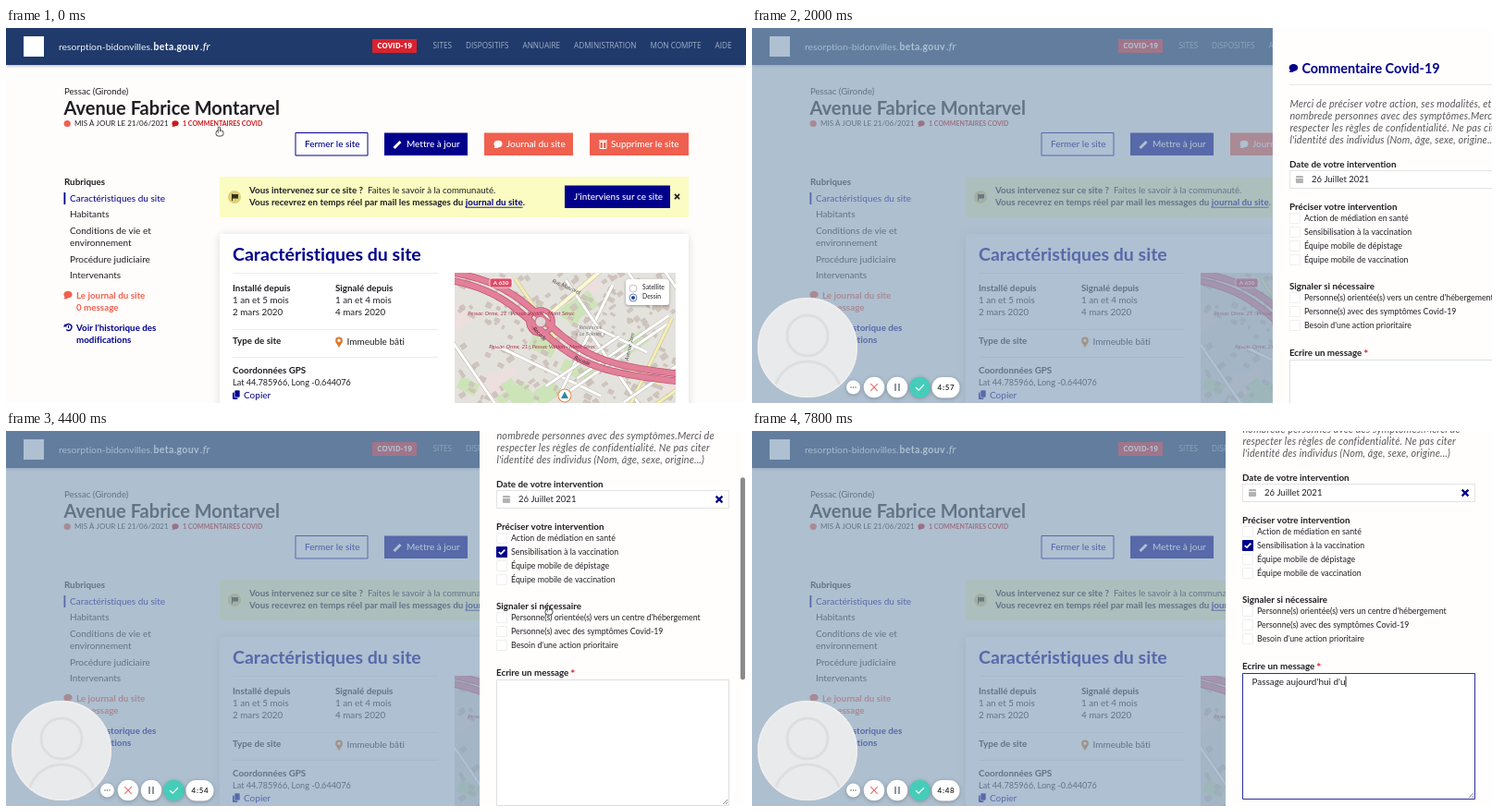
An HTML page with a canvas for the animation above (8 s loop, 800x406 px).

```html
<!DOCTYPE html>
<html lang="fr">
<head>
<meta charset="utf-8">
<title>Suivi de site</title>
<style>
html, body { margin: 0; width: 100%; height: 100%; overflow: hidden; background: #fffdfb; }
canvas { display: block; width: 100vw; height: 100vh; }
</style>
</head>
<body>
<canvas id="stage" width="800" height="406"></canvas>
<script>
const ctx = document.getElementById('stage').getContext('2d');
const LOOP = 8000, STEP = 200;
const NAVY = '#00008b', CORAL = '#f0604f', INK = '#1f1f24', RED = '#c9191e';

// Progress from 0 to 1 between two times, easing out by the given power
const ramp = (t, from, to, power = 2) =>
  1 - (1 - Math.min(1, Math.max(0, (t - from) / (to - from)))) ** power;

// y is the middle of the capitals; the tiny spacing switches ligatures off
function text(s, x, y, size, color = INK, weight = 400, o = {}) {
  ctx.font = `${o.italic ? 'italic ' : ''}${weight} ${size}px ${o.family || 'Lato'}, sans-serif`;
  ctx.textAlign = o.align || 'left';
  ctx.letterSpacing = (o.spacing || 0.01) + 'px';
  ctx.fillStyle = color;
  ctx.fillText(s, x, y + size * 0.35);
  return ctx.measureText(s).width;
}

const bold = (s, x, y, color = INK) => text(s, x, y, 9.8, color, 700);

function lines(list, x, y, gap, write) {
  list.forEach((s, i) => write(s, x, y + i * gap, i));
}

function paint(fill, stroke, lw = 1) {
  if (fill) { ctx.fillStyle = fill; ctx.fill(); }
  if (stroke) { ctx.strokeStyle = stroke; ctx.lineWidth = lw; ctx.stroke(); }
}

function box(x, y, w, h, fill, stroke, r = 0, lw = 1) {
  ctx.beginPath();
  ctx.roundRect(x, y, w, h, r);
  paint(fill, stroke, lw);
}

function disc(x, y, r, fill, stroke, lw = 1) {
  ctx.beginPath();
  ctx.arc(x, y, r, 0, 7);
  paint(fill, stroke, lw);
}

function line(x, y, dx, dy, color, lw = 1) {
  ctx.beginPath();
  ctx.moveTo(x, y);
  ctx.lineTo(x + dx, y + dy);
  paint(null, color, lw);
}

function triangle(x, y, w, h, color) {
  ctx.beginPath();
  ctx.moveTo(x, y);
  ctx.lineTo(x + w / 2, y + h);
  ctx.lineTo(x - w / 2, y + h);
  paint(color);
}

function cross(x, y, r, color, lw) {
  line(x - r, y - r, 2 * r, 2 * r, color, lw);
  line(x - r, y + r, 2 * r, -2 * r, color, lw);
}

function tick(x, y, size, color, lw) {
  ctx.beginPath();
  ctx.moveTo(x - size, y);
  ctx.lineTo(x - size * 0.3, y + size * 0.65);
  ctx.lineTo(x + size, y - size * 0.7);
  paint(null, color, lw);
}

function withShadow(blur, color, draw) {
  ctx.save();
  ctx.shadowBlur = blur;
  ctx.shadowColor = color;
  ctx.shadowOffsetY = 1;
  draw();
  ctx.restore();
}

function placed(x, y, angle, draw) {
  ctx.save();
  ctx.translate(x, y);
  ctx.rotate(angle);
  draw();
  ctx.restore();
}

function speech(x, y, r, color) {
  ctx.beginPath();
  ctx.ellipse(x, y - r * 0.1, r, r * 0.82, 0, 0, 7);
  paint(color);
  triangle(x - r * 0.5, y, r, r * 0.9, color);
}

function seeded(seed) {
  return () => (seed = (seed * 16807) % 2147483647) / 2147483647;
}

function drawHeader() {
  withShadow(3, 'rgba(0,0,40,.3)', () => box(0, 0, 800, 40, '#203a6b'));
  box(19, 9, 22, 22, '#fff');
  text('resorption-bidonvilles.', 57, 20, 10.35, '#eef2fa');
  text('beta.gouv', 159.5, 20, 10.5, '#fff', 700, { spacing: 0.35 });
  text('.fr', 210, 20, 12, '#fff', 400, { italic: true });
  box(396, 12, 48, 15, '#d9232e', null, 1);
  text('COVID-19', 420, 19.5, 8.2, '#fff', 700, { family: "'Open Sans'", align: 'center' });
  let right = 784.5;
  for (const s of ['AIDE', 'MON COMPTE', 'ADMINISTRATION', 'ANNUAIRE', 'DISPOSITIFS', 'SITES']) {
    right -= 15 + text(s, right, 19.5, 8.2, '#a3b0c8', 400, { family: "'Open Sans'", align: 'right' });
  }
}

function button(x, y, w, label, labelX, fill, ink = '#fff', edge = null) {
  box(x, y, w, 24.5, fill, edge);
  text(label, labelX, y + 12.5, 9.95, ink, 500);
}

function drawButtons() {
  button(313, 113.5, 78, 'Fermer le site', 323, '#fff', NAVY, NAVY);
  button(409, 113.5, 90, 'Mettre à jour', 433, NAVY);
  line(419.5, 130, 7, -7, '#fff', 3);
  button(517, 113.5, 96, 'Journal du site', 541, CORAL);
  speech(532, 126, 4.5, '#fff');
  button(631, 113.5, 107, 'Supprimer le site', 654, CORAL);
  box(642, 123.5, 7, 7, null, '#fff');
  line(641, 122, 9, 0, '#fff', 1.3);
  line(645.5, 124, 0, 6, '#fff', 1.2);
}

function drawSidebar() {
  bold('Rubriques', 63, 167);
  box(62.5, 178, 1.8, 13, NAVY);
  let y = 184;
  for (const item of ['Caractéristiques du site', 'Habitants', 'Conditions de vie et|environnement',
    'Procédure judiciaire', 'Intervenants']) {
    const rows = item.split('|');
    lines(rows, 69, y, 13.2, (s, x, ly) => text(s, x, ly, 10, y === 184 ? NAVY : INK));
    y += 4.4 + 13.2 * rows.length;
  }
  speech(67, 289, 4.6, CORAL);
  lines(['Le journal du site', '0 message'], 76, 290, 13, (s, x, ly) => bold(s, x, ly, CORAL));
  ctx.beginPath();
  ctx.arc(67.5, 324, 3.4, -2.7, 2.3);
  paint(null, NAVY, 1.4);
  triangle(64, 320, 4, 3.5, NAVY);
  line(67.5, 322, 0, 3, NAVY);
  lines(["Voir l'historique des", 'modifications'], 76, 325, 13, (s, x, ly) => bold(s, x, ly, NAVY));
}

function drawBanner() {
  box(231, 161, 507, 44, '#fbfcc1');
  disc(247, 183, 7, '#dfcf78');
  line(244.5, 179.5, 0, 7.5, '#33301c');
  box(245, 180, 6, 4.6, '#33301c');
  bold('Vous intervenez sur ce site ?', 263, 176);
  text('Faites le savoir à la communauté.', 391, 176, 9.6);
  const x = 263 + bold('Vous recevrez en temps réel par mail les messages du ', 263, 189);
  const w = bold('journal du site', x, 189, NAVY);
  line(x, 194.2, w, 0, NAVY, 0.9);
  bold('.', x + w, 189);
  button(604, 170.5, 114, "J'interviens sur ce site", 614, NAVY);
  cross(725.5, 182.5, 2.6, INK, 1.7);
}

function mapLabel(s, x, y, angle = 0, color = '#a8324e') {
  placed(x, y, angle, () => text(s, 0, 0, 6, color, 400, { align: 'center', italic: true }));
}

function motorway(shift, color, lw) {
  ctx.beginPath();
  for (let x = 480; x <= 730; x += 5) {
    const d = x - 578;
    ctx.lineTo(x, 320 + shift + 44 * Math.tanh((d + shift) / 55) + 0.1 * d);
  }
  paint(null, color, lw);
}

function drawMap() {
  const rnd = seeded(71);
  const spot = draw => placed(485 + rnd() * 239, 265 + rnd() * 141, rnd() < 0.5 ? 0.45 : -0.6, draw);
  ctx.save();
  ctx.beginPath();
  ctx.rect(485, 265, 239, 141);
  ctx.clip();
  box(485, 265, 239, 141, '#e4e2dc');
  for (let i = 0; i < 16; i++) {
    spot(() => box(-15, -9, 14 + rnd() * 26, 10 + rnd() * 16, i % 3 ? '#cde3b8' : '#ecdfdd'));
  }
  for (let i = 0; i < 230; i++) {
    spot(() => box(0, 0, 2 + rnd() * 6, 2 + rnd() * 4, '#d0c5be', '#bfb2aa', 0, 0.4));
  }
  for (let i = 0; i < 16; i++) {
    spot(() => {
      const half = 25 + rnd() * 45, turn = i % 2 ? 0 : Math.PI / 2;
      ctx.rotate(turn);
      line(-half, 0, 2 * half, 0, '#bdb8b2', 4);
      line(-half, 0, 2 * half, 0, i % 5 ? '#fff' : '#f5efae', 3);
    });
  }
  line(578, 318, 66, -56, '#c3bfa8', 5);
  line(578, 318, 66, -56, '#fbf8d4', 4);
  for (const [color, grow] of [['#c25673', 1.6], ['#e2809a', 0]]) {
    motorway(-4, color, 6 + grow);
    motorway(4, color, 6 + grow);
    disc(578, 318, 13, null, color, 4 + grow);
  }
  disc(578, 318, 6, '#ddd8d5', '#d27b92', 1.4);

  box(523, 271, 24, 10, '#dd4d68', '#fff', 2, 0.7);
  text('A 630', 535, 276, 6.2, '#fff', 700, { align: 'center' });
  const exit = 'Pessac Orme, 21 : Pessac Valdon - Mont Sérac';
  mapLabel(exit, 557, 309);
  mapLabel(exit, 580, 345);
  mapLabel('Rocade', 577, 331, 0.8, '#5c2435');
  mapLabel('Rocade', 623, 360, 0.4, '#5c2435');
  mapLabel('Rue Malvoret', 606, 280, 0.42, '#555');
  mapLabel('Avenue Jorn', 674, 345, -1.35, '#555');
  lines(['Résidence', '« Le Solmet »'], 632, 324, 7, (s, x, y) => mapLabel(s, x, y, 0, '#777'));

  withShadow(3, 'rgba(0,0,0,.35)', () => box(670, 272, 47, 28, '#fff', null, 3));
  lines(['Satellite', 'Dessin'], 688, 281, 10, (s, x, y, i) => {
    disc(678, y + 1, 4, '#fff', i ? '#3f5ea5' : '#b5b5b5', 0.8);
    if (i) disc(678, y + 1, 2.1, '#28498f');
    text(s, x, y, 6.8);
  });
  disc(604, 398, 7, '#fff', '#e38a4c', 1.1);
  triangle(604, 393.5, 8, 7.5, '#2b8aa0');
  ctx.restore();
}

function drawCard() {
  withShadow(10, 'rgba(0,0,0,.14)', () => box(231, 223, 507, 200, '#fff', null, 2));
  text('Caractéristiques du site', 245, 245.5, 19.5, NAVY, 700);
  for (const y of [265.5, 326.5, 356.5]) line(245, y, 222, 0, '#ececec');
  bold('Installé depuis', 245, 282);
  lines(['1 an et 5 mois', '2 mars 2020'], 245, 295, 13, (s, x, y) => text(s, x, y, 9.8));
  bold('Signalé depuis', 356, 282);
  lines(['1 an et 4 mois', '4 mars 2020'], 356, 295, 13, (s, x, y) => text(s, x, y, 9.8));
  bold('Type de site', 245, 339);
  placed(360, 346, Math.PI, () => triangle(0, 0, 7, 6, '#dd7a2c'));
  disc(360, 338.3, 2.8, '#fff', '#dd7a2c', 2.2);
  text('Immeuble bâti', 368.5, 339, 10);
  bold('Coordonnées GPS', 245, 371);
  text('Lat 44.785966, Long -0.644076', 245, 384, 9.1);
  box(245, 394.5, 5.5, 7.5, NAVY, null, 1);
  box(247, 392, 6, 8, NAVY, '#fff', 1, 0.7);
  text('Copier', 257, 397.5, 10, NAVY);
  drawMap();
}

function drawPage() {
  box(0, 0, 800, 406, '#fffdfb');
  drawHeader();
  text('Pessac (Gironde)', 63, 69, 9.6);
  text('Avenue Fabrice Montarvel', 62.5, 87, 20, INK, 700);
  disc(66.2, 103.5, 3.6, CORAL);
  text('MIS À JOUR LE 21/06/2021', 74, 103.5, 8);
  speech(183, 103.5, 3.6, RED);
  text('1 COMMENTAIRES COVID', 191, 103.5, 7.05, RED, 700);
  drawButtons();
  drawSidebar();
  drawBanner();
  drawCard();
}

function checkbox(x, y, label, checked) {
  box(x + 0.5, y - 5.5, 11, 11, checked ? NAVY : '#fff', checked ? NAVY : '#efefef');
  if (checked) tick(x + 6, y, 3.3, '#fff', 1.7);
  text(label, x + 16, y, 8.8);
}

const scrollAt = t => 34 * ramp(t, 2600, 3200) + 63 * ramp(t, 4000, 4600);

function drawDrawer(t, left) {
  const scroll = scrollAt(t), focused = t >= 5200, x = left + 18;
  box(left, 0, 800 - left, 406, '#fffefd');
  ctx.save();
  ctx.translate(0, -scroll);
  speech(left + 22.5, 43.5, 4.8, NAVY);
  text('Commentaire Covid-19', left + 31.5, 43.5, 14.4, NAVY, 700);
  line(x, 61.5, 252, 0, '#e8e8e8');
  lines(['Merci de préciser votre action, ses modalités, et le',
    'nombrede personnes avec des symptômes.Merci de',
    'respecter les règles de confidentialité. Ne pas citer',
    "l'identité des individus (Nom, âge, sexe, origine...)"
  ], x + 0.5, 82, 13, (s, lx, y) => text(s, lx, y, 10.8, '#58585c', 400, { italic: true, spacing: 0.15 }));

  bold('Date de votre intervention', x, 147.5);
  box(x + 0.5, 154.5, 251, 19, '#fff', '#e3e3e3');
  box(x + 7, 160, 8, 8, '#b3b3b3', null, 1);
  line(x + 7, 162.5, 8, 0, '#fff', 0.8);
  text('26 Juillet 2021', x + 24, 164, 9.5);
  cross(x + 241, 164, 3.4, NAVY, 2.2);

  bold('Préciser votre intervention', x, 194);
  lines(['Action de médiation en santé', 'Sensibilisation à la vaccination',
    'Équipe mobile de dépistage', 'Équipe mobile de vaccination'
  ], x, 206, 15, (s, lx, y, i) => checkbox(lx, y, s, i === 1 && t >= 3800));

  bold('Signaler si nécessaire', x, 280);
  lines(["Personne(s) orientée(s) vers un centre d'hébergement",
    'Personne(s) avec des symptômes Covid-19', "Besoin d'une action prioritaire"
  ], x, 292, 15, (s, lx, y) => checkbox(lx, y, s, false));

  const w = bold('Ecrire un message', x, 352);
  text('*', x + w + 2, 353, 12, '#e0202c', 700);
  box(x + 0.5, 359.5, 251, 136, '#fff', focused ? '#2d2d9c' : '#dedede');
  for (const d of [2, 5]) line(x + 250 - d, 494, d, -d, '#777', 0.8);
  if (focused) {
    const count = Math.max(0, Math.floor((t - 5960) / 80));
    const typed = text("Passage aujourd'hui d'u".slice(0, count), x + 10.5, 368.5, 9.9);
    line(x + 11 + (count && typed), 362.5, 0, 11.5, '#111', 0.9);
  }
  ctx.restore();
  if (t >= 2600 && t < 5000) box(794, 2 + scroll * 0.535, 5, 219, '#8b8b8d', null, 2.5);
}

function drawRecorder(t) {
  const fill = t < 1800 ? '#e1e1e1' : '#e9eaeb', rim = t < 1800 ? '#d8d8d8' : '#dddee0';
  const raised = draw => withShadow(4, 'rgba(0,0,0,.25)', draw);
  const knob = (x, r, color = '#fff') => raised(() => disc(x, 389, r, color));
  ctx.save();
  ctx.globalAlpha = ramp(t, 0, 600);
  ctx.save();
  disc(60, 346, 54, fill);
  ctx.clip();
  disc(60, 397, 36, fill, rim, 3);
  disc(60, 333, 22, fill, rim, 3);
  ctx.restore();
  disc(60, 346, 53.3, null, '#efefef', 1.4);

  knob(109.5, 7.5);
  for (const d of [-2.5, 0, 2.5]) disc(109.5 + d, 389, 0.7, '#555');
  knob(132, 11.3);
  cross(132, 389, 3.8, '#ee6a6a', 1.1);
  knob(157, 11.3);
  for (const d of [-2, 2]) line(157 + d, 385, 0, 8, '#555d70', 1.3);
  knob(181.5, 11.3, '#45cdb9');
  tick(181.5, 389.3, 4.4, '#fff', 1.3);
  raised(() => box(194.5, 378, 30, 22.5, '#fff', null, 11));
  const left = Math.min(300, Math.floor(300.65 - t * 0.0015));
  const clock = `${Math.floor(left / 60)}:${String(left % 60).padStart(2, '0')}`;
  text(clock, 210, 389.3, 8, '#333', 700, { align: 'center', spacing: 0.7 });
  ctx.restore();
}

function drawHand(x, y) {
  placed(x, y, 0, () => {
    box(-4, -1, 8, 6, '#fff', '#333', 2.5, 0.9);
    box(-1.7, -5, 2.2, 7, '#fff', '#333', 1.1, 0.9);
    box(-1.3, 0, 4, 3.5, '#fff');
  });
}

function drawPointer(t) {
  if (t < 2000) return drawHand(231, 112);
  if (t < 2600 || t >= 5200) return;
  const enter = ramp(t, 2400, 3000), toBox = ramp(t, 3200, 3800);
  const away = ramp(t, 3800, 4400), down = ramp(t, 4400, 5000);
  drawHand(560 + 57 * enter - 80 * toBox + 50 * away + 23 * down,
    205 + 27 * enter - 44 * toBox + 6 * away + 96 * down);
}

function draw(t) {
  drawPage();
  const open = ramp(t, 1800, 2200, 2.5);
  if (open > 0) {
    box(0, 0, 800, 406, 'rgba(133,160,186,.66)');
    drawDrawer(t, 800 - 288 * open);
  }
  drawRecorder(t);
  drawPointer(t);
}

let shown = -1;
const start = performance.now();
function play() {
  const t = Math.floor(((performance.now() - start) % LOOP) / STEP) * STEP;
  if (t !== shown) draw(shown = t);
  requestAnimationFrame(play);
}
play();
</script>
</body>
</html>
```
